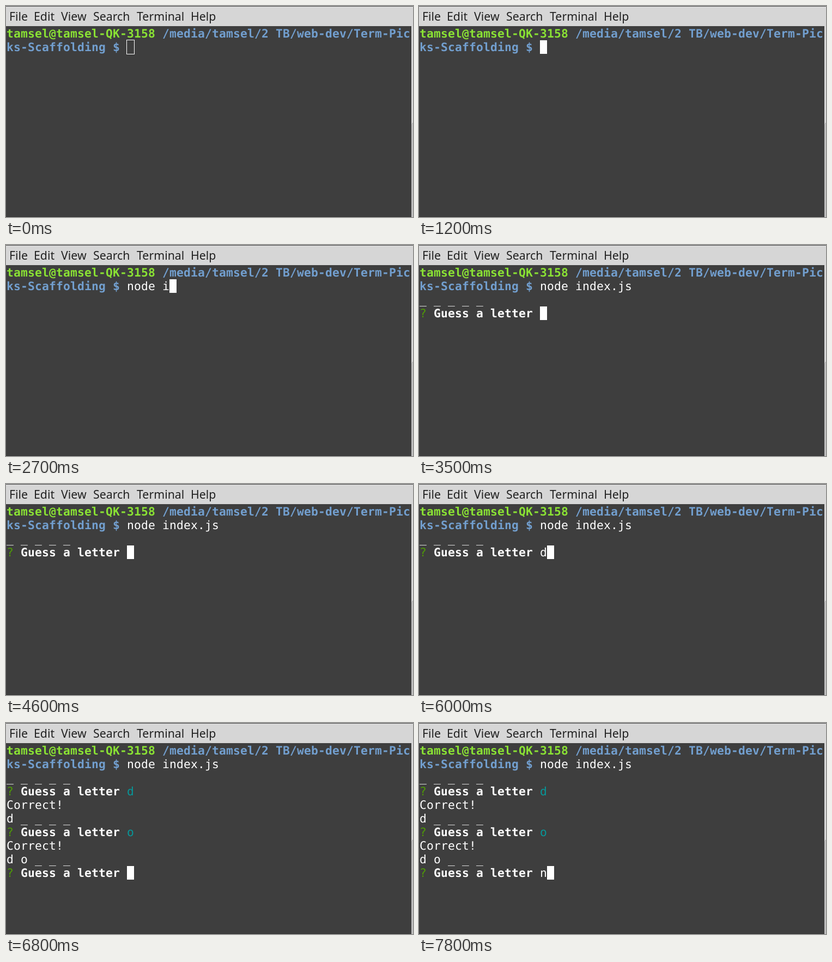
These frames come from a looping animation (747 by 388 pixels, 8000 ms). An HTML page:

```html
<!DOCTYPE html>
<html lang="en">
<head>
<meta charset="utf-8">
<title>Terminal word game</title>
<style>
  html, body { margin: 0; width: 100%; height: 100%; overflow: hidden; }
  body { position: relative; background: #3e3e3e; }
  .menu {
    position: absolute; inset: 0 0 auto; height: 37px; box-sizing: border-box;
    background: #d6d6d6; border-top: 1px solid #4a4a4a;
    font: 21.33px/36px "Noto Sans", sans-serif; color: #212121;
  }
  .menu span { position: absolute; top: 0; white-space: pre; }
  .screen {
    position: absolute; left: 1px; top: 39px; margin: 0; color: #fff;
    font: 21.333px/25px "DejaVu Sans Mono", monospace;
    letter-spacing: calc(13px - 1ch);
    text-rendering: geometricPrecision;
  }
  .user { color: #8ae234; }
  .path { color: #729fcf; }
  .mark { color: #4e9a06; font-weight: 400; }
  .answer { color: #06989a; }
  .cursor { position: absolute; width: 13px; height: 25px; background: #fff; }
  .cursor.hollow { margin: -1px; border: 1px solid #fff; background: none; }
  .scroll {
    position: absolute; left: 744px; top: 37px; width: 3px; bottom: 0;
    background: #d6d6d6; overflow: hidden;
  }
  .scroll::after {
    content: ""; position: absolute; left: 1px; top: 177px; width: 14px; height: 200px;
    border: 1px solid #8c8c8c; border-radius: 4px; background: #e8e8e8;
  }
  .edge { position: absolute; left: 0; right: 3px; bottom: 0; height: 1px; background: #343434; }
  .pointer { position: absolute; left: 0; top: 0; width: 14px; height: 24px; overflow: visible; }
  .pointer path { fill: none; stroke-linejoin: round; }
</style>
</head>
<body>
<div class="menu">
  <span style="left:6px">File</span>
  <span style="left:51px">Edit</span>
  <span style="left:101px">View</span>
  <span style="left:160px">Search</span>
  <span style="left:240px">Terminal</span>
  <span style="left:339px">Help</span>
</div>
<pre class="screen" id="screen"></pre>
<div class="cursor" id="cursor"></div>
<div class="scroll"></div>
<div class="edge"></div>
<svg class="pointer" id="pointer" viewBox="0 0 14 24">
  <path id="arrow" d="M1 1V19L5 15L8 22L11 21L8 14H13Z" style="fill:#fff;stroke:#000"/>
  <g id="beam">
    <path d="M3 2Q7 2 7 5Q7 2 11 2M7 5V19M3 22Q7 22 7 19Q7 22 11 22" stroke="#fff" stroke-width="4"/>
    <path d="M3 2Q7 2 7 5Q7 2 11 2M7 5V19M3 22Q7 22 7 19Q7 22 11 22" stroke="#000" stroke-width="2"/>
  </g>
</svg>
<script>
  const LOOP = 8000, CELL = 13, ROW = 25, TOP = 38, LEFT = 1;
  const WORD_LENGTH = 5, LETTERS = "don", INDENT = 17;
  const $ = id => document.getElementById(id);
  const span = (name, text) => `<span class="${name}">${text}</span>`;

  // [start ms, stage, typed text, cursor]; stage 0 = shell, 1 = launching, 2+ = guesses
  const steps = [
    [0, 0, "", "hollow"],
    [1200, 0, "", "solid"],
    [1900, 0, "", "off"],
    [2300, 0, "no", "solid"],
    [2400, 0, "nod", "solid"],
    [2700, 0, "node i", "solid"],
    [2900, 0, "node index.js ", "solid"],
    [3200, 1, "", "solid"],
    [3500, 2, "", "solid"],
    [3900, 2, "", "off"],
    [4600, 2, "", "solid"],
    [5300, 2, "", "off"],
    [6000, 2, "d", "solid"],
    [6100, 3, "", "solid"],
    [6600, 3, "o", "solid"],
    [6800, 4, "", "solid"],
    [7500, 4, "", "off"],
    [7800, 4, "n", "solid"]
  ];

  // [start ms, x, y] of the mouse pointer
  const moves = [[700, 241, 1], [800, 276, 72], [900, 318, 158], [1000, 338, 201]];
  const POINTER_END = 1200;

  const latest = (list, t) => list.filter(item => item[0] <= t).pop();

  const blanks = known => Array.from({ length: WORD_LENGTH },
    (_, i) => i < known ? LETTERS[i] : "_").join(" ");

  function linesFor(stage, typed) {
    const command = stage ? "node index.js" : typed;
    const lines = [
      `<b>${span("user", "tamsel@tamsel-QK-3158")} ${span("path", "/media/tamsel/2 TB/web-dev/Term-Pic")}</b>`,
      `<b>${span("path", "ks-Scaffolding $")}</b> ${command}`
    ];
    if (stage === 1) lines.push("");
    for (let i = 0; i <= stage - 2; i++) {
      const answer = i < stage - 2 ? span("answer", LETTERS[i]) : typed;
      if (i) lines.push("Correct!");
      lines.push(blanks(i), `${span("mark", "?")} <b>Guess a letter</b> ${answer}`);
    }
    return lines;
  }

  let shown;
  function drawScreen(step) {
    if (step === shown) return;
    shown = step;
    const [, stage, typed, look] = step;
    const lines = linesFor(stage, typed);
    const column = stage === 1 ? 0 : INDENT + typed.length;
    const cursor = $("cursor");
    $("screen").innerHTML = lines.join("\n");
    cursor.className = "cursor " + look;
    cursor.style.display = look === "off" ? "none" : "block";
    cursor.style.left = LEFT + column * CELL + "px";
    cursor.style.top = TOP + (lines.length - 1) * ROW + "px";
  }

  function drawPointer(t) {
    const move = t < POINTER_END && latest(moves, t);
    $("pointer").style.display = move ? "block" : "none";
    if (!move) return;
    const [, x, y] = move, overMenu = y < 37;
    $("pointer").style.transform = `translate(${x}px, ${y}px)`;
    $("arrow").style.display = overMenu ? "inline" : "none";
    $("beam").style.display = overMenu ? "none" : "inline";
  }

  const start = performance.now();
  function frame() {
    const t = (performance.now() - start) % LOOP;
    drawScreen(latest(steps, t));
    drawPointer(t);
    requestAnimationFrame(frame);
  }
  frame();
</script>
</body>
</html>
```
